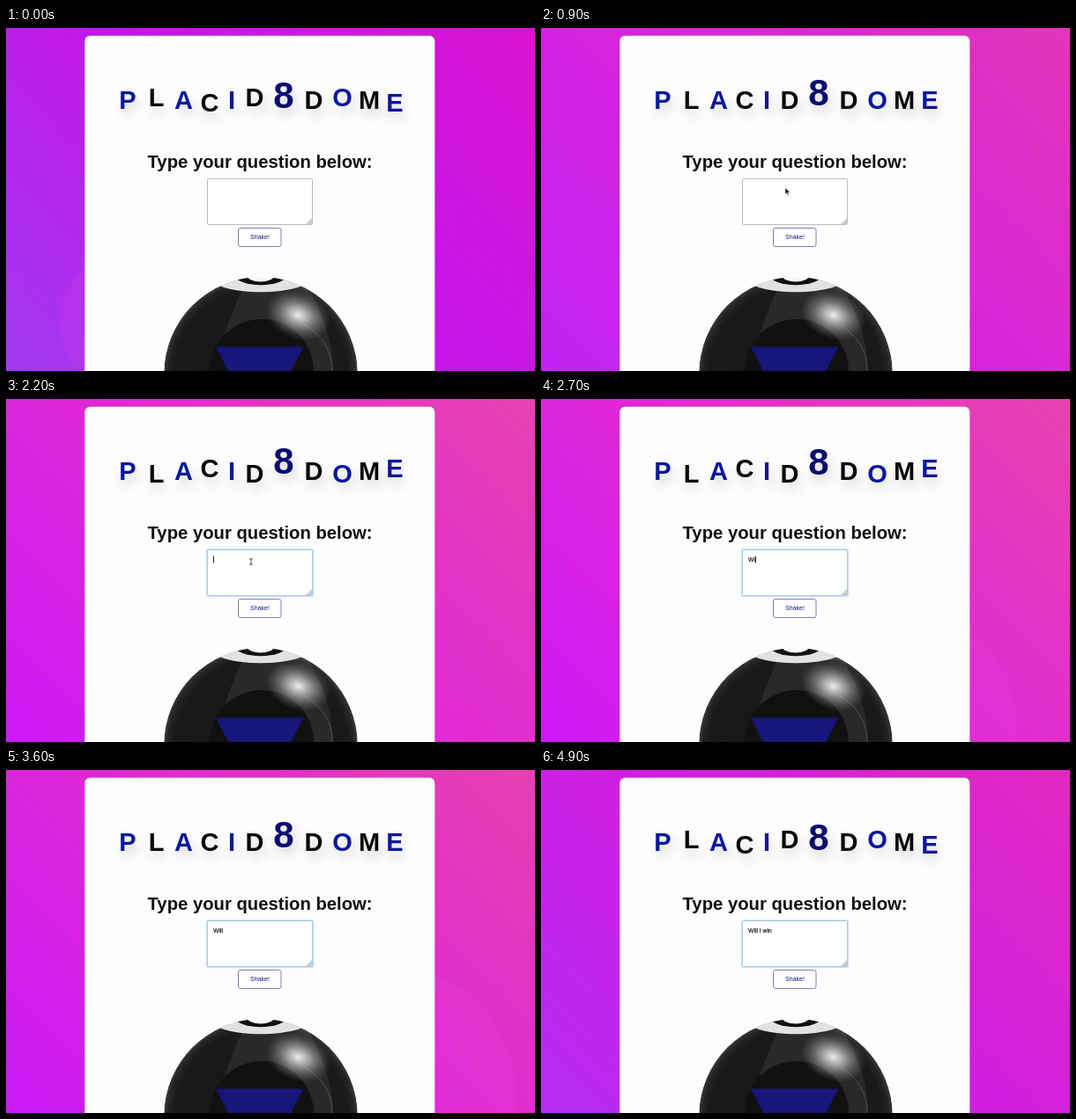
These frames come from a looping animation (600x390 px, 5000 ms). An HTML page:

```html
<!DOCTYPE html>
<html lang="en">
<head>
<meta charset="utf-8">
<title>Placid 8 Dome</title>
<style>
  html, body { margin: 0; width: 100%; height: 100%; overflow: hidden; }
  svg { display: block; width: 600px; height: 390px; font-family: "Liberation Sans", Arial, sans-serif; }
  #title { font-weight: bold; text-anchor: middle; filter: drop-shadow(3px 8px 6px rgba(0, 0, 0, .15)); }
</style>
</head>
<body>
<svg viewBox="0 0 600 390">
  <defs>
    <linearGradient id="sky" gradientUnits="userSpaceOnUse" x1="52" y1="443" x2="548" y2="-53">
      <stop offset="0"/><stop offset=".5"/><stop offset="1"/>
    </linearGradient>
    <radialGradient id="shell">
      <stop offset="0" stop-color="#161616"/>
      <stop offset=".9" stop-color="#1a1a1b"/>
      <stop offset=".96" stop-color="#252526"/>
      <stop offset="1" stop-color="#3a3a3a"/>
    </radialGradient>
    <radialGradient id="shine">
      <stop offset="0" stop-color="#fff" stop-opacity=".92"/>
      <stop offset=".35" stop-color="#eee" stop-opacity=".58"/>
      <stop offset="1" stop-color="#999" stop-opacity="0"/>
    </radialGradient>
    <clipPath id="crop"><rect x="170" y="284" width="240" height="106"/></clipPath>
    <clipPath id="round"><circle cx="289" cy="393" r="109.8"/></clipPath>
  </defs>

  <rect width="600" height="390" fill="url(#sky)"/>
  <circle id="bubble" fill="#f048e4"/>
  <rect x="89.3" y="8.7" width="397" height="400" rx="6" fill="#fdfdfe"/>

  <g id="title"></g>
  <text x="160.5" y="159" font-size="20.25" font-weight="bold" fill="#111">Type your question below:</text>

  <rect id="glow" x="227.5" y="170.8" width="121" height="53.6" rx="2" fill="none" stroke="#cfe4fa" stroke-width="1.6"/>
  <rect id="box" x="228.5" y="171.5" width="119" height="52" rx="1" fill="#fff"/>
  <path d="M340 223L347 216V223Z" fill="#ccc"/>
  <text id="typed" x="235" y="185" font-size="6.8" fill="#000" stroke="#000" stroke-width=".12" xml:space="preserve" style="white-space:pre"></text>
  <rect id="caret" y="178.5" width=".9" height="8" fill="#111"/>

  <rect x="263.5" y="227.5" width="48.5" height="21" rx="2.5" fill="#fff" stroke="#7a80b8"/>
  <text x="288" y="240.3" font-size="7" text-anchor="middle" fill="#0c1680">Shake!</text>

  <g clip-path="url(#crop)">
    <g clip-path="url(#round)">
      <circle cx="289" cy="393" r="109.8" fill="url(#shell)"/>
      <path d="M271 292Q246 340 239 390H371Q370 340 340 292Z" fill="#fff" opacity=".07"/>
      <path d="M338 337Q370 356 370 390" fill="none" stroke="#505050"/>
      <ellipse cx="289" cy="283" rx="58" ry="17.3" fill="#e2e2e2"/>
      <ellipse cx="289" cy="280" rx="30" ry="12.3" fill="#111"/>
      <ellipse cx="288.8" cy="281" rx="15.5" ry="7.5" fill="#fafafa"/>
      <circle cx="290" cy="390" r="59" fill="#111112"/>
      <path d="M238 362.5H337.5L287.5 458Z" fill="#18167a"/>
      <ellipse cx="331.5" cy="326.5" rx="38" ry="27" transform="rotate(20 331.5 326.5)" fill="url(#shine)"/>
    </g>
  </g>

  <path id="arrow" d="M0 0V7.5L1.8 6 3 8.7 4.2 8.1 3 5.6H5.3Z" fill="#111" stroke="#fff" stroke-width=".5"/>
  <path id="beam" d="M276.3 181.5Q278 181.5 278 182.5Q278 181.5 279.7 181.5M278 182V188M276.3 188.5Q278 188.5 278 187.5Q278 188.5 279.7 188.5"
    fill="none" stroke="#333" stroke-width=".9"/>
</svg>
<script>
const $ = id => document.getElementById(id);
const LOOP = 5000, STEP = 100, FOCUS = 1100, TYPING = 2500;
const message = "Will I win ";
const keyTimes = [2500, 2600, 2800, 2900, 3000, 3700, 3800, 4000, 4100, 4200, 4400];

const word = "PLACID8DOME";
const centers = [138, 170.5, 201.5, 231, 256, 282, 315, 349, 381.5, 412, 441];
const blue = [0, 2, 4, 8, 10];
const bob = { 1: 1, 5: 1, 8: 1, 3: -1, 6: -1, 10: -1 };
const letters = [...word].map((char, i) => {
  const el = document.createElementNS("http://www.w3.org/2000/svg", "text");
  const big = i === 6;
  el.textContent = char;
  el.setAttribute("x", centers[i]);
  el.setAttribute("font-size", big ? 42 : 29);
  el.setAttribute("fill", big ? "#0c0c70" : blue.includes(i) ? "#0a189c" : "#080808");
  $("title").append(el);
  return el;
});

const stops = document.querySelectorAll("#sky stop");
const skyFrom = [[160, 58, 240], [196, 22, 236], [218, 20, 208]];
const skyTo = [[205, 25, 247], [224, 40, 212], [232, 66, 176]];

const mix = (a, b, p) => a + (b - a) * p;
const clamp = p => Math.min(1, Math.max(0, p));
const show = (id, on) => $(id).style.display = on ? "" : "none";
const set = (id, attrs) => {
  for (const key in attrs) $(id).setAttribute(key, attrs[key]);
};

function drawSky(t) {
  const p = 1 - Math.abs(1 - t / 2700) ** 3;
  stops.forEach((stop, i) => {
    const rgb = skyFrom[i].map((c, k) => Math.round(mix(c, skyTo[i][k], p)));
    stop.setAttribute("stop-color", `rgb(${rgb})`);
  });
  // faint disc drifting out from behind the card
  const q = (t - 2700) / 1400;
  const early = t < 800;
  set("bubble", early
    ? { cx: 140 + t * .05, cy: 335, r: 80, opacity: .12 * (1 - t / 800) }
    : { cx: mix(410, 440, q), cy: 370, r: Math.max(0, mix(130, 160, q)),
        opacity: .16 * clamp((t - 2000) / 800) * clamp((4800 - t) / 600) });
}

function drawTitle(t) {
  const wave = 3 * Math.cos((t - 2250) / 5400 * 2 * Math.PI);
  letters.forEach((el, i) => el.setAttribute("y", (i === 6 ? 88.2 : 92) + (bob[i] || 0) * wave));
}

function drawField(t) {
  const focused = t >= FOCUS;
  const count = keyTimes.filter(k => k <= t).length;
  const last = count ? keyTimes[count - 1] : FOCUS;
  $("typed").textContent = message.slice(0, count);
  show("glow", focused);
  set("box", { stroke: focused ? "#a2c8ee" : "#bbb" });
  show("caret", focused && (t - last) % 1000 < 500);
  set("caret", { x: 235 + (count ? $("typed").getComputedTextLength() : 0) });
}

function drawPointer(t) {
  const p = clamp((t - 500) / 400), ease = 1 - (1 - p) ** 2;
  show("arrow", t >= 500 && t < FOCUS);
  set("arrow", { transform: `translate(${mix(300, 277, ease)} ${mix(215, 181.5, ease)})` });
  show("beam", t >= FOCUS && t < TYPING);
}

function draw(now) {
  const t = Math.floor(now % LOOP / STEP) * STEP;
  drawSky(t);
  drawTitle(t);
  drawField(t);
  drawPointer(t);
}

let start;
function tick(now) {
  start ??= now;
  draw(now - start);
  requestAnimationFrame(tick);
}
draw(0);
requestAnimationFrame(tick);
</script>
</body>
</html>
```
